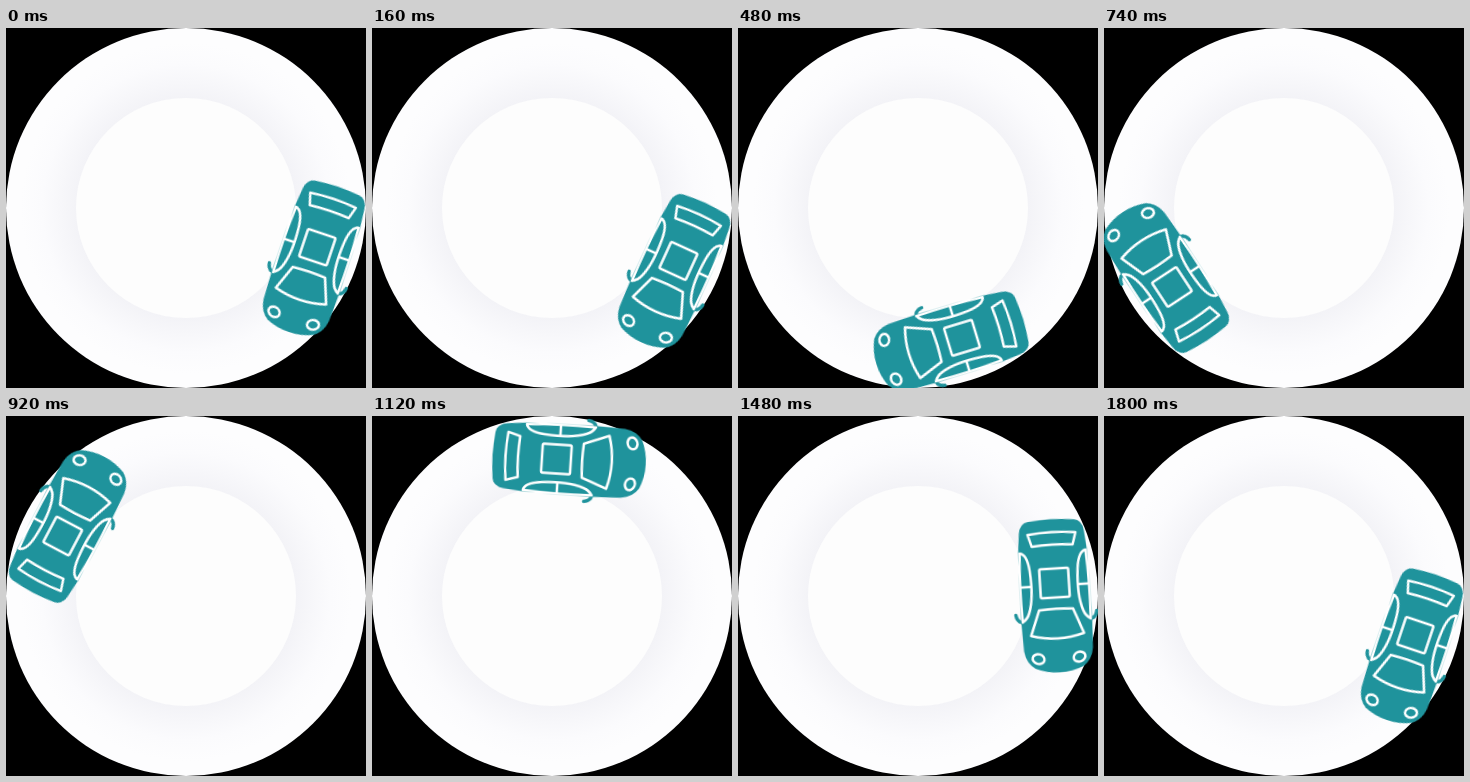
An HTML page that plays this animation: 360 by 360 pixels, repeating every 1820 ms.

```html
<!DOCTYPE html>
<html lang="en">
<head>
<meta charset="utf-8">
<title>Car driving around a plate</title>
<style>
  html, body {
    margin: 0;
    width: 100%;
    height: 100%;
    overflow: hidden;
    background: #000;
  }
  svg {
    display: block;
    width: 100vw;
    height: 100vh;
  }
  .orbit {
    transform-origin: 180px 180px;
    animation: drive 1820ms -6ms infinite;
  }
  /* one eased lap, then a 20 ms rest */
  @keyframes drive {
    0% { transform: rotate(18.5deg); animation-timing-function: ease-in-out; }
    98.9%, 100% { transform: rotate(378.5deg); }
  }
  .paint { fill: #1f939c; }
  .mirror { fill: none; stroke: #1f939c; stroke-width: 3.4; stroke-linecap: round; }
  .trim { fill: none; stroke: #fff; stroke-width: 2.5; stroke-linejoin: round; }
</style>
</head>
<body>
<svg viewBox="0 0 360 360">
  <defs>
    <radialGradient id="rim" gradientUnits="userSpaceOnUse" cx="180" cy="180" r="180">
      <stop offset=".61" stop-color="#f3f3f7"/>
      <stop offset=".7" stop-color="#f7f7fa"/>
      <stop offset=".8" stop-color="#fbfbfd"/>
      <stop offset=".92" stop-color="#fdfdfe"/>
    </radialGradient>
    <g id="side">
      <path class="mirror" d="M-35 25C-38 24 -40 22 -40.5 17.5"/>
      <g class="trim">
        <path d="M-33 -44C-27 -43 -25 -36 -24 -26C-22.5 -9 -23 5 -27 16Q-29 22 -34 25Q-35.5 -10 -33 -44Z"/>
        <path d="M-34.5 -10H-23.5"/>
        <ellipse cx="-20.5" cy="62.5" rx="6" ry="4.8" transform="rotate(18 -20.5 62.5)"/>
      </g>
    </g>
  </defs>

  <circle cx="180" cy="180" r="180" fill="url(#rim)"/>
  <circle cx="180" cy="180" r="110" fill="#fdfdfd"/>

  <g class="orbit">
    <g transform="translate(317 188)">
      <path class="paint" d="M-23 -75Q0 -78 23 -75Q31 -74 32.5 -64Q35 -45 35 -25Q36 0 35.5 25Q35 40 34.5 54Q33 66 24 72Q13 77 0 77Q-13 77 -24 72Q-33 66 -34.5 54Q-35 40 -35.5 25Q-36 0 -35 -25Q-35 -45 -32.5 -64Q-31 -74 -23 -75Z"/>
      <use href="#side"/>
      <use href="#side" transform="scale(-1 1)"/>
      <g class="trim">
        <path d="M-24 -62Q0 -65 24 -62L20.5 -50Q0 -52 -20.5 -50Z"/>
        <rect x="-14.5" y="-27" width="29" height="29" rx="1.5"/>
        <path d="M-17 14Q0 12.5 17 14L26.5 39Q0 47 -26.5 39Z"/>
      </g>
    </g>
  </g>
</svg>
</body>
</html>
```
